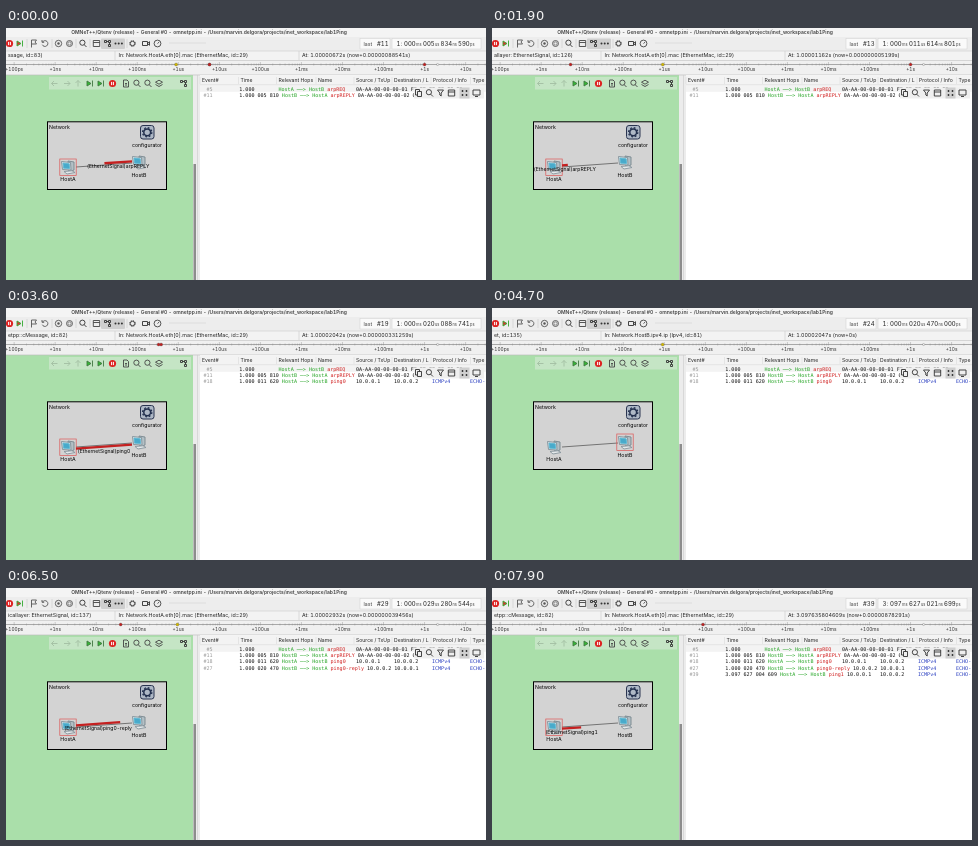
Write an HTML page that moves like this. It is 480 by 252 pixels and loops after 8000 ms.

```html
<!DOCTYPE html>
<html lang="en">
<head>
<meta charset="utf-8">
<title>Network simulation</title>
<style>
html, body { margin: 0; width: 100%; height: 100%; overflow: hidden; background: #fff; }
svg { display: block; width: 480px; height: 252px; font-family: Inter, "Liberation Sans", sans-serif; font-variant-numeric: tabular-nums; }
.mono { font-family: "DejaVu Sans Mono", "Liberation Mono", monospace; }
</style>
</head>
<body>
<svg id="stage" viewBox="0 0 480 252"><g id="base"></g><g id="live"></g><g id="top"></g></svg>
<script>
const $ = id => document.getElementById(id);
const text = (x, y, s, size = 5.2, fill = '#222', extra = '') =>
  `<text x="${x}" y="${y}" font-size="${size}" fill="${fill}" ${extra}>${s}</text>`;
const mid = 'text-anchor="middle"';
const rect = (x, y, w, h, fill, extra = '') =>
  `<rect x="${x}" y="${y}" width="${w}" height="${h}" fill="${fill}" ${extra}/>`;
const line = (x1, y1, x2, y2, color, w = .6) =>
  `<path d="M${x1} ${y1}L${x2} ${y2}" stroke="${color}" stroke-width="${w}"/>`;
const dot = (x, y, r, fill, extra = '') => `<circle cx="${x}" cy="${y}" r="${r}" fill="${fill}" ${extra}/>`;
const path = (x, y, d, color = '#555', fill = 'none') =>
  `<path transform="translate(${x} ${y})" d="${d}" stroke="${color}" fill="${fill}" stroke-width=".9"/>`;

// Icon outlines, centred on their own origin
const I = {
  page: 'M-2.5-3.5H1L2.5-2V3.5H-2.5Z M-1 0H1 M-1 1.5H1',
  copy: 'M-1-1.5H3V3.5H-1Z M-1 2H-3V-3.5H1V-1.5',
  flag: 'M-2.5 4V-3.5H2.5L1-1.5L2.5 .5H-2.5',
  reload: 'M-2.5-1.5A2.9 2.9 0 1 1-2.7 1.2 M-3-3.5V-1.2H-.8',
  lens: 'M1.2 1.2L3.5 3.5 M2-.8A2.6 2.6 0 1 1-3.2-.8A2.6 2.6 0 1 1 2-.8Z',
  box: 'M-3.2-3H3.2V3H-3.2Z M-3.2-1H3.2',
  bars: 'M-3-2.5H3 M-3 0H3 M-3 2.5H3',
  camera: 'M-3.5-2H1.5V2H-3.5Z M1.5 0L3.5-1.8V1.8Z',
  screen: 'M-3.5-3H3.5V2H-3.5Z M-1.5 3.5H1.5',
  layers: 'M0-3.3L3.5-1.3L0 .7L-3.5-1.3Z M-3.5 1L0 3L3.5 1',
  nodes: 'M-3-3H-1V-1H-3Z M1-3H3V-1H1Z M1 1H3V3H1Z M-1-2H1 M2-1V1',
  dots: 'M-3-2H-1 M1-2H3 M-3 2H-1 M1 2H3 M-2-3V-1 M2-3V-1 M-2 1V3 M2 1V3',
  step: 'M-3-2.5L1 0L-3 2.5Z M2.5-3V3',
  left: 'M3 0H-3 M-.5-2.5L-3 0L-.5 2.5',
  right: 'M-3 0H3 M.5-2.5L3 0L.5 2.5',
  up: 'M0 3V-3 M-2.5-.5L0-3L2.5-.5',
  funnel: 'M-3-3H3L.7 0V3L-.7 2V0Z',
};
const stop = (x, y) => dot(x, y, 3.6, '#d22') + rect(x - 1.4, y - 1.6, 1, 3.2, '#fff') + rect(x + .4, y - 1.6, 1, 3.2, '#fff');
const ring = (x, y, r, color) => dot(x, y, r, 'none', `stroke="${color}" stroke-width=".9"`);
const gear = (x, y, r, color) =>
  dot(x, y, r, 'none', `stroke="${color}" stroke-width="${r * .45}"`) +
  dot(x, y, r * 1.35, 'none', `stroke="${color}" stroke-width="${r * .4}" stroke-dasharray="${r * .53}"`);

const host = (x, y) =>
  path(x, y, 'M0-6L6-5V3L1 5Z', '#77868e', '#b4c0c6') +
  path(x, y, 'M-6.5-5.5L2.5-4.5L3 3L-5.5 2.5Z', '#7e8f98', '#dbe6ea') +
  path(x, y, 'M-5-4L1.2-3.2L1.6 1.6L-4.5 1.2Z', '#5fb9d3', '#48aacb') +
  path(x, y, 'M-4 4.5L4 3.8L7 5.5L-1 7Z', '#87959c', '#e4e9eb');

const axis = us => 172.3 + 41.04 * Math.log10(us);

function drawBase() {
  let s = rect(0, 0, 480, 47, '#ededed') + rect(0, 0, 480, 9, '#f4f4f4');
  s += text(203, 5.8, 'OMNeT++/Qtenv (release) - General #0 - omnetpp.ini - /Users/marvin.delgora/projects/inet_workspace/lab1Ping', 5, '#444', mid + ' font-weight="600"');

  // Main toolbar
  s += stop(3.5, 15.5) + path(14, 15.5, I.step, '#3a3', '#d33') + path(28, 15.5, I.flag) + path(39, 15.5, I.reload);
  s += ring(52.5, 15.5, 3.2, '#555') + dot(52.5, 15.5, 1.2, '#555') + ring(63.5, 15.5, 3, '#555') + gear(63.5, 15.5, 1.5, '#777');
  s += path(77, 15.5, I.lens, '#333');
  s += rect(95, 10.5, 24, 10.5, '#cfcfcf', 'rx="1"') + path(90.5, 15.5, I.box, '#444') + path(101.5, 15.5, I.nodes, '#333');
  s += [109.5, 112.7, 115.9].map(x => dot(x, 15.5, 1, '#333')).join('');
  s += gear(126.5, 15.5, 2.2, '#444') + path(140, 15.5, I.camera, '#333');
  s += ring(151.5, 15.5, 3.4, '#444') + path(151.5, 15.5, 'M0 0L1.6-1.4', '#444');
  s += line(163, 15, 200, 15, '#ddd', 1);
  s += [21, 46, 70, 84, 121].map(x => line(x, 11, x, 20, '#ccc')).join('');
  s += rect(354, 10.5, 30, 10.5, '#fafafa', 'stroke="#d0d0d0" stroke-width=".5"');
  s += rect(386, 10.5, 89, 10.5, '#fafafa', 'stroke="#d0d0d0" stroke-width=".5"');
  s += text(357.5, 18.3, 'last', 5.2, '#444');
  s += rect(0, 23, 480, 9, '#f3f3f3') + line(0, 23, 480, 23, '#ccc') + line(0, 32.5, 480, 32.5, '#c4c4c4');
  s += line(109, 23, 109, 32, '#ccc') + line(293, 23, 293, 32, '#ccc');

  // Logarithmic timeline
  s += rect(0, 33, 480, 13.5, '#f0f0f0') + line(0, 36.5, 480, 36.5, '#777');
  '100ps 1ns 10ns 100ns 1us 10us 100us 1ms 10ms 100ms 1s 10s'.split(' ').forEach((label, i) => {
    const us = 10 ** (i - 4);
    s += text(axis(us), 43.1, '+' + label, 4.8, '#333', mid);
    for (let k = 1; k < 10; k++) s += line(axis(us * k), k > 1 ? 35.5 : 34, axis(us * k), 37.5, '#888', .4);
  });

  // Network canvas
  s += rect(0, 47, 187, 205, '#aadfaa') + rect(187, 47, 7, 205, '#ececec') + rect(187.5, 136, 2.5, 116, '#8d8d8d');
  s += line(0, 47, 480, 47, '#bbb') + line(191.5, 47, 191.5, 252, '#ccc');
  s += rect(43, 49, 142, 12.5, '#e2ece2', 'opacity=".5"');
  s += path(48.5, 55.5, I.left, '#a3bfa3') + path(61, 55.5, I.right, '#a3bfa3') + path(72, 55.5, I.up, '#a3bfa3');
  s += path(84, 55.5, I.step, '#474', '#3b3') + path(95, 55.5, I.step, '#474', '#3b3') + stop(106.5, 55.5);
  s += path(120, 55.5, I.page, '#444') + path(131, 55.5, I.lens, '#444');
  s += path(142, 55.5, I.lens, '#444') + path(153, 55.5, I.layers, '#444') + path(177.5, 55.5, I.nodes, '#333');
  s += rect(41.5, 93.8, 119, 67.7, '#d3d3d3', 'stroke="#000" stroke-width="1"');
  s += text(43, 101.2, 'Network', 5.2, '#000');
  s += rect(134.5, 97.5, 13.5, 13.5, '#aeb8c6', 'rx="2.5" stroke="#2a3450"') + gear(141.2, 104.3, 3.4, '#24314f');
  s += text(141, 118.9, 'configurator', 5.2, '#000', mid);
  s += line(70, 139, 126, 135, '#333', .6) + host(62, 139) + host(133, 134);
  s += text(62, 153.2, 'HostA', 5.3, '#000', mid) + text(133, 149, 'HostB', 5.3, '#000', mid);

  // Message log
  s += rect(194, 47.5, 286, 204.5, '#fff') + rect(194, 48, 286, 9, '#f3f3f3') + line(194, 57, 480, 57, '#ccc');
  s += rect(194, 57.8, 286, 6, '#f3f3f3');
  [[196, 'Event#'], [234.5, 'Time'], [272.5, 'Relevant Hops'], [312, 'Name'], [350, 'Source / TxUp'],
   [388, 'Destination / L'], [427, 'Protocol / Info'], [466.5, 'Type']].forEach(([x, label]) => {
    s += text(x, 54.3, label, 5.1) + line(x - 2, 49, x - 2, 56, '#d5d5d5', .5);
  });
  $('base').innerHTML = s;

  s = rect(408, 59.5, 70, 11, '#efefef') + rect(453.5, 59.5, 10, 11, '#cfcfcf');
  s += path(412.5, 65, I.copy, '#333') + path(423.5, 65, I.lens, '#333') + path(434.5, 65, I.funnel, '#333');
  s += path(445.5, 65, I.box, '#333') + path(458.5, 65, I.dots, '#333') + path(470.5, 65, I.screen, '#333');
  $('top').innerHTML = s;
}

// Simulation times are microseconds after 1 s
const P = 2097627.004609;
const clockKeys = [
  [0, 5.83459], [506, 5.86], [1006, 11.57], [1100, 11.574717], [1900, 11.614801], [2004, 11.62],
  [2150, 11.62], [3148, 11.67], [3600, 20.088741], [3619, 20.42], [4617, 20.47], [4790, 20.47],
  [5788, 20.52], [6290, 29.27], [6500, 29.280544], [7288, 29.32], [7420, 29.32], [7420, P],
  [7560, P], [7900, P + .01709], [8558, P + .05],
];
function simTime(t) {
  const i = clockKeys.findLastIndex(k => k[0] <= t);
  const [[t0, a], [t1, b]] = clockKeys.slice(i, i + 2);
  return a + (b - a) * (t - t0) / (t1 - t0);
}

const mac = { A: 'HostA.eth[0].mac (EthernetMac, id=29)', B: 'HostB.eth[0].mac (EthernetMac, id=56)' };
const ip = { A: 'HostA.ipv4.ip (Ipv4, id=54)', B: 'HostB.ipv4.ip (Ipv4, id=81)' };
const signal = id => `allayer: EthernetSignal, id=${id})`;
const endTx = id => `etpp::cMessage, id=${id})`;
const endGap = id => `ssage, id=${id})`;
// start, last event number, next message, host, module table, due time
const phases = [
  [0, 11, endGap(83), 'A', mac, 6.72],
  [581, 12, endTx(109), 'B', mac, 11.57],
  [1006, 13, signal(126), 'A', mac, 11.62],
  [2004, 16, 'et, id=128)', 'A', ip, 11.62],
  [2150, 18, endGap(110), 'B', mac, 12.53],
  [3194, 19, endTx(82), 'A', mac, 20.42],
  [3619, 20, signal(132), 'B', mac, 20.47],
  [4617, 24, 'et, id=135)', 'B', ip, 20.47],
  [4790, 27, endGap(83), 'A', mac, 21.38],
  [5837, 28, endTx(109), 'B', mac, 29.27],
  [6290, 29, 'ic' + signal(137), 'A', mac, 29.32],
  [7288, 33, 'et, id=139)', 'A', ip, 29.32],
  [7380, 35, endGap(110), 'B', mac, 30.23],
  [7420, 38, 'et, id=143)', 'A', ip, P],
  [7560, 39, endTx(82), 'A', mac, P + 8.8],
];

// label, from HostA, sent at, duration, visible from/to
const signals = [
  ['arpREPLY', false, 5.81, 5.76, 0, 2004],
  ['ping0', true, 11.62, 8.8, 2150, 4617],
  ['ping0-reply', false, 20.47, 8.8, 4790, 7288],
  ['ping1', true, P, 8.8, 7560, 8000],
];

const RED = '#c02020', YELLOW = '#d2b800', PALE = '#fff';
// due time, colour, shown from, shown until
const pending = [
  [P, PALE, 0, 7420], [P + 2.1e6, PALE, 7420], [1e6, RED, 0, 2004],
  [6.72, YELLOW, 0], [12.53, YELLOW, 1006], [21.38, YELLOW, 3619], [30.23, YELLOW, 6290],
  [11.57, RED, 0], [11.62, RED, 0], [20.42, RED, 2150], [20.47, RED, 2150],
  [29.27, RED, 4790], [29.32, RED, 4790], [P + 8.8, RED, 7560],
];

// shown from, number, time, from, to, name, source, destination
const rows = [
  [0, 5, '1.000', 'A', 'B', 'arpREQ', '0A-AA-00-00-00-01', 'FF-FF-FF-FF-FF-FF'],
  [0, 11, '1.000 005 810', 'B', 'A', 'arpREPLY', '0A-AA-00-00-00-02', '0A-AA-00-00-00-01'],
  [2150, 18, '1.000 011 620', 'A', 'B', 'ping0', '10.0.0.1', '10.0.0.2'],
  [4790, 27, '1.000 020 470', 'B', 'A', 'ping0-reply', '10.0.0.2', '10.0.0.1'],
  [7560, 39, '3.097 627 004 609', 'A', 'B', 'ping1', '10.0.0.1', '10.0.0.2'],
];
const CHAR = 3.04;

function drawRow([, id, time, from, to, name, src, dst], i) {
  const y = 62.5 + 6.4 * i;
  let end = 0, s = '';
  // A cell that overflows pushes the next one right
  const cell = (x, str, color) => {
    x = Math.max(x, end + CHAR);
    s += text(x, y, str, 5.05, color);
    end = x + str.length * CHAR;
  };
  s += text(206.5, y, '#' + id, 5.05, '#999', 'text-anchor="end"');
  cell(233.3, time, '#111');
  cell(272.5, `Host${from} ──> Host${to}`, '#22a322');
  cell(312, name, '#d02020');
  cell(350, src, '#111');
  cell(388, dst, '#111');
  if (i > 1) { cell(426, 'ICMPv4', '#2a3fc0'); cell(464, 'ECHO-', '#2a3fc0'); }
  return s;
}

function drawSignal([name, fromA, sent, duration], now) {
  const part = at => Math.min(1, Math.max(0, (now - at) / .05));
  const shift = fromA ? 1.7 : -1.7;
  const point = f => {
    const k = fromA ? f : 1 - f;
    return [70 + 56 * k, 139 - 4 * k + shift];
  };
  const [x1, y1] = point(part(sent + duration)), [x2, y2] = point(part(sent));
  return line(x1, y1, x2, y2, '#c42020', 2.3) +
    text((x1 + x2) / 2, (y1 + y2) / 2 + 6.2, `(EthernetSignal)${name}`, 5.05, '#000', mid);
}

function drawClock(now) {
  const ps = Math.round(now * 1e6);
  let s = text(390.5, 18.4, 1 + Math.floor(ps / 1e12) + ':', 6);
  ['ms', 'us', 'ns', 'ps'].forEach((unit, i) => {
    const x = [398, 417, 434.5, 452][i];
    const digits = String(Math.floor(ps / 1000 ** (3 - i)) % 1000).padStart(3, '0');
    s += text(x, 18.4, digits, 6) + text(x + 12, 18.4, unit, 3.9, '#444');
  });
  return s;
}

const seconds = v => v.toFixed(12).replace(/\.?0+$/, '');

function draw(t) {
  const now = simTime(t);
  const [, last, message, hostId, table, due] = phases.findLast(p => p[0] <= t);
  let s = text(371, 18.4, '#' + last, 6) + drawClock(now);
  s += text(2, 29.4, message, 5.3) + text(112.5, 29.4, `In: Network.${table[hostId]}`, 5.3);
  s += text(296, 29.4, `At: ${seconds(1 + due / 1e6)}s (now+${seconds(Math.max(0, due - now) / 1e6)}s)`, 5.3);

  for (const [at, color, from, to = 8000] of pending)
    if (t >= from && t < to && at > now)
      s += dot(Math.max(1, axis(at - now)), 36.5, color === PALE ? 1 : 1.5, color, 'stroke="#555" stroke-width=".3"');

  const [hx, hy] = hostId === 'A' ? [53.8, 131] : [124.8, 126];
  s += rect(hx, hy, 16.4, 16.4, 'none', 'stroke="#dc5555" stroke-width=".7"');
  for (const sig of signals) if (t >= sig[4] && t < sig[5]) s += drawSignal(sig, now);

  s += `<g class="mono">${rows.filter(r => r[0] <= t).map(drawRow).join('')}</g>`;
  $('live').innerHTML = s;
}

drawBase();
const start = performance.now();
let shown = -1;
function tick() {
  const step = Math.floor(Math.max(0, performance.now() - start) % 8000 / 100);
  if (step !== shown) draw((shown = step) * 100);
  requestAnimationFrame(tick);
}
tick();
</script>
</body>
</html>
```
